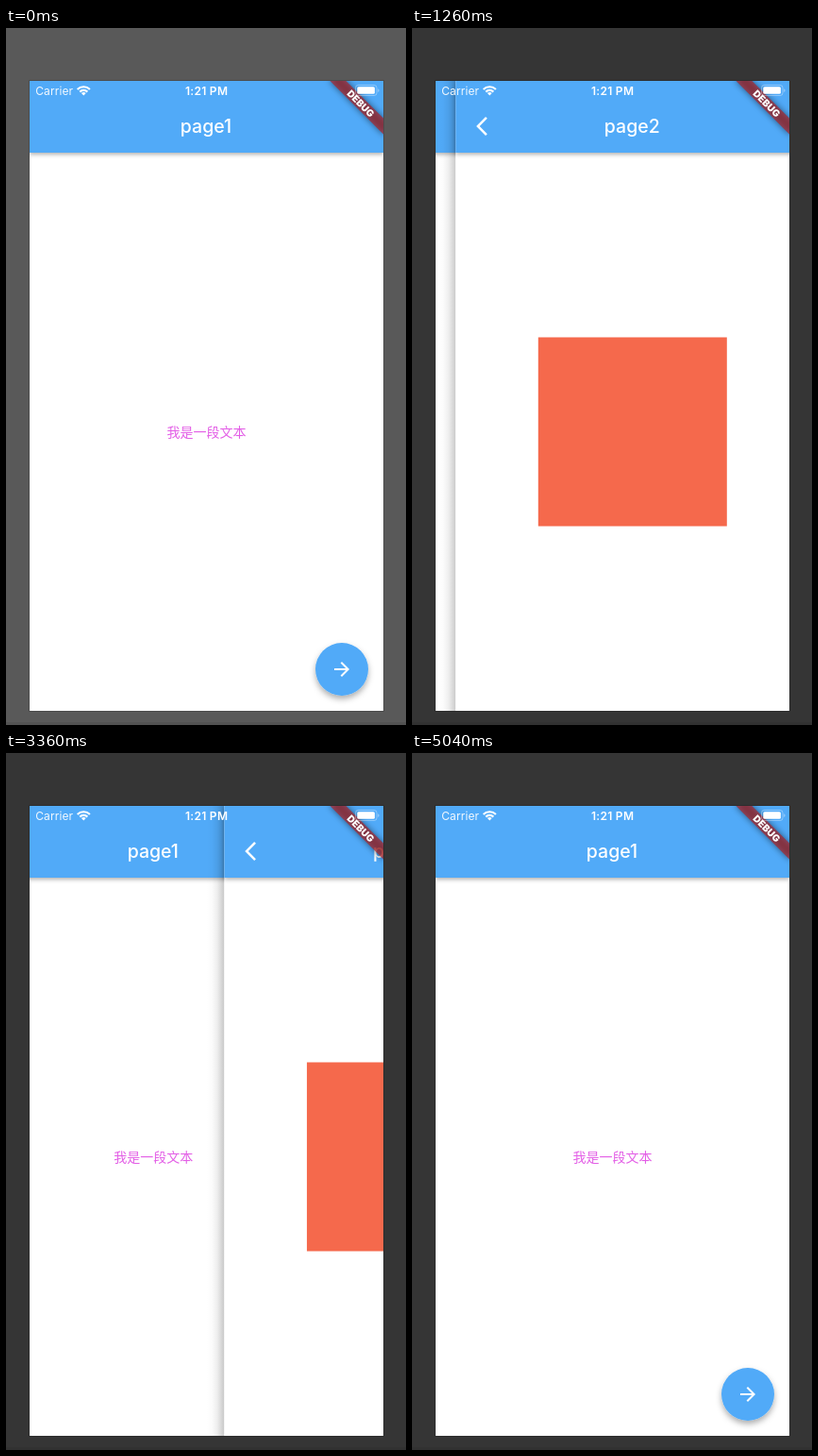
An HTML page that plays this animation: 424x738 px, repeating every 5.25 s.

```html
<!DOCTYPE html>
<html lang="zh">
<head>
<meta charset="utf-8">
<title>Page transition</title>
<style>
  html, body { margin: 0; width: 100%; height: 100%; overflow: hidden; background: #595959; }
  svg { display: block; width: 100%; height: 100%; }
  text { font-family: Inter, Roboto, sans-serif; fill: #fff; }
  .title { font-size: 19.5px; font-weight: 500; text-anchor: middle; }
  .status { font-size: 12px; }
  .label { font: 14px "Noto Sans CJK SC", "Noto Sans CJK", sans-serif; fill: #e35fe6; text-anchor: middle; }
</style>
</head>
<body>
<svg viewBox="0 0 424 738" xmlns="http://www.w3.org/2000/svg">
  <defs>
    <clipPath id="screen"><rect width="375" height="667"/></clipPath>
    <filter id="barShadow" x="-5%" y="-20%" width="110%" height="150%">
      <feDropShadow dx="0" dy="2" stdDeviation="2" flood-color="#000" flood-opacity=".3"/>
    </filter>
    <filter id="fabShadow" x="-30%" y="-30%" width="160%" height="170%">
      <feDropShadow dx="0" dy="3.5" stdDeviation="3" flood-color="#000" flood-opacity=".32"/>
    </filter>
    <filter id="blur" x="-30%" y="-150%" width="160%" height="400%">
      <feGaussianBlur stdDeviation="3.5"/>
    </filter>
    <linearGradient id="edgeFade">
      <stop offset="0" stop-opacity="0"/>
      <stop offset=".3" stop-opacity=".016"/>
      <stop offset=".6" stop-opacity=".07"/>
      <stop offset="1" stop-opacity=".22"/>
    </linearGradient>
    <g id="base">
      <rect width="375" height="667" fill="#fff"/>
      <rect width="375" height="76" fill="#51aaf8" filter="url(#barShadow)"/>
    </g>
  </defs>

  <rect id="backdrop" width="424" height="738" fill="#595959"/>
  <rect y="735" width="424" height="3" fill="#000" opacity=".08"/>

  <g transform="translate(25 56)">
    <rect x="-.5" y="-.5" width="376" height="668" fill="none" stroke="#000" stroke-opacity=".15"/>
    <g clip-path="url(#screen)">
      <g id="first">
        <use href="#base"/>
        <text class="title" x="187" y="55">page1</text>
        <text class="label" x="187.5" y="376.5">我是一段文本</text>
        <circle cx="331" cy="623" r="28" fill="#51aaf8" filter="url(#fabShadow)"/>
        <path transform="translate(319 611)" fill="#fff"
          d="M12 4l-1.41 1.41L16.17 11H4v2h12.17l-5.58 5.59L12 20l8-8z"/>
      </g>

      <g id="second">
        <rect id="edge" x="-18.75" width="18.75" height="667" fill="url(#edgeFade)"/>
        <use href="#base"/>
        <path transform="translate(16 36)" fill="#fff"
          d="M17.51 3.87L15.73 2.1 5.84 12l9.9 9.9 1.77-1.77L9.38 12z"/>
        <text class="title" x="187" y="55">page2</text>
        <rect x="87.5" y="271.5" width="200" height="200" fill="#f5694c"/>
      </g>

      <g transform="translate(375 0) rotate(45)">
        <rect x="-40" y="28" width="80" height="12" opacity=".5" filter="url(#blur)"/>
        <rect x="-40" y="28" width="80" height="12" fill="#b71c1c" fill-opacity=".63"/>
        <text y="37.7" font-size="10.2" font-weight="900" text-anchor="middle">DEBUG</text>
      </g>

      <g fill="#fff">
        <text class="status" x="6.2" y="14.5" letter-spacing=".1" opacity=".92">Carrier</text>
        <text class="status" x="187.6" y="14.5" font-weight="600" letter-spacing=".3" text-anchor="middle">1:21 PM</text>
        <g transform="translate(57.3 15.6)">
          <path d="M0 0L-2.4 -2.5A3.5 3.5 0 0 1 2.4 -2.5Z"/>
          <path d="M-6.6 -6.6A9.35 9.35 0 0 1 6.6 -6.6M-4 -4A5.65 5.65 0 0 1 4 -4"
            fill="none" stroke="#fff" stroke-width="2.2"/>
        </g>
        <rect x="345.5" y="4.5" width="22.5" height="11" rx="2.8" fill="none" stroke="#fff" stroke-opacity=".35"/>
        <rect x="347.3" y="6.2" width="18.6" height="7.6" rx="1.5"/>
        <path d="M369.2 8.2a2 2 0 0 1 0 3.8z" opacity=".4"/>
      </g>
    </g>
  </g>
</svg>

<script>
  const LOOP = 5250, TICK = 70;
  const WIDTH = 375, SLIDE = 250;
  const PUSH = 1121, POP = 3306, DARKEN = 980;

  const get = id => document.getElementById(id);
  const backdrop = get("backdrop"), first = get("first"), second = get("second"), edge = get("edge");

  const clamp = v => Math.min(1, Math.max(0, v));
  const cubic = (a, b, s) => 3 * (1 - s) ** 2 * s * a + 3 * (1 - s) * s * s * b + s ** 3;

  // Cubic bezier (.35, .91, .33, .97), solved by bisection
  function ease(x) {
    if (x <= 0 || x >= 1) return clamp(x);
    let lo = 0, hi = 1;
    for (let i = 0; i < 24; i++) {
      const mid = (lo + hi) / 2;
      if (cubic(.35, .33, mid) < x) lo = mid; else hi = mid;
    }
    return cubic(.91, .97, lo);
  }

  function draw(time) {
    const t = Math.floor((time % LOOP) / TICK) * TICK;
    const pushed = clamp((t - PUSH) / SLIDE);
    const popped = clamp((t - POP) / SLIDE);
    const shown = ease(pushed) - ease(popped);
    const shade = popped > 0 ? ease(1 - popped) : ease(pushed);

    backdrop.setAttribute("fill", t < DARKEN ? "#595959" : "#353535");
    first.setAttribute("transform", `translate(${-shown * WIDTH / 3} 0)`);
    second.setAttribute("transform", `translate(${(1 - shown) * WIDTH} 0)`);
    second.setAttribute("visibility", shown > 0 ? "visible" : "hidden");
    edge.setAttribute("opacity", shade);
  }

  function loop(now) {
    draw(now);
    requestAnimationFrame(loop);
  }
  draw(0);
  requestAnimationFrame(loop);
</script>
</body>
</html>
```
